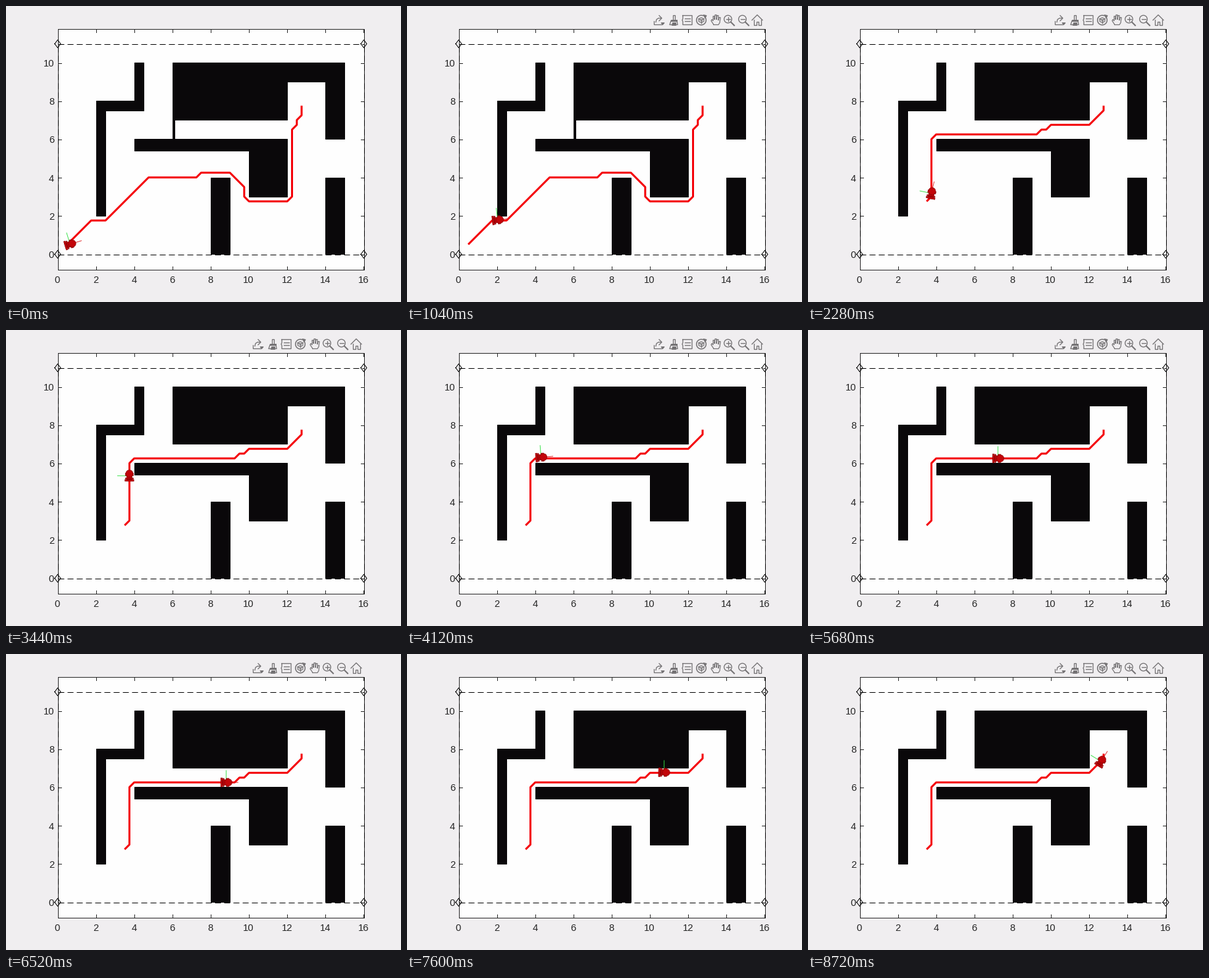
Recreate the animation shown at these times as a matplotlib script. Size 600 px wide and 450 px high, loop 8760 ms.

```python
import numpy as np
import matplotlib.pyplot as plt
from matplotlib.animation import FuncAnimation
from matplotlib.patches import Circle, Polygon, Rectangle
from matplotlib.transforms import Affine2D

W, H, DPI = 600, 450, 100
FRAMES, INTERVAL = 219, 40
PX = 72 / DPI
BLACK, INK, GRAY = "#0a080a", "#262626", "#747274"
RED, BODY, EDGE = "#f40008", "#c2060a", "#8a0206"

# pure pursuit settings, in map units per step
STEP, MAX_TURN, LOOKAHEAD = 0.075, 0.15, 0.5
LEAD = 2          # steps already driven when the loop starts
REPLAN = 51       # new route and removed wall
TOOLBAR_ON = 1

ROUTE_A = [(.5, .5), (1.75, 1.75), (2.5, 1.75), (4.75, 4), (7.25, 4),
           (7.5, 4.25), (9, 4.25), (9.75, 3.5), (9.75, 3), (10, 2.75),
           (12, 2.75), (12.25, 3), (12.25, 6.5), (12.5, 6.75), (12.5, 7),
           (12.75, 7.25), (12.75, 7.75)]
ROUTE_B = [(3.5, 2.75), (3.75, 3), (3.75, 6), (4, 6.25), (9.25, 6.25),
           (9.5, 6.5), (9.75, 6.5), (10, 6.75), (12, 6.75), (12.75, 7.5),
           (12.75, 7.75)]
WALLS = [
    [(2, 2), (2.5, 2), (2.5, 7.5), (4.5, 7.5), (4.5, 10), (4, 10), (4, 8), (2, 8)],
    [(6, 10), (15, 10), (15, 6), (14, 6), (14, 9), (12, 9), (12, 7), (6, 7)],
    [(4, 6), (12, 6), (12, 3), (10, 3), (10, 5.4), (4, 5.4)],
    [(8, 0), (9, 0), (9, 4), (8, 4)],
    [(14, 0), (15, 0), (15, 4), (14, 4)],
]
DOOR = [(6, 6), (6.1, 6), (6.1, 7), (6, 7)]


def to_px(pts):
    return np.asarray(pts, float) * (29.06, -29.09) + (78.5, 377)


def densify(route, gap=0.005):
    pts = np.array(route)
    s = np.r_[0, np.cumsum(np.hypot(*np.diff(pts, axis=0).T))]
    d = np.arange(0, s[-1], gap)
    return np.c_[np.interp(d, s, pts[:, 0]), np.interp(d, s, pts[:, 1])]


def drive():
    """Follow the routes and return one (x, y, heading) per frame."""
    a, b = densify(ROUTE_A), densify(ROUTE_B)
    x, y, th = 0.5, 0.5, 0.0
    poses = []
    for k in range(FRAMES + LEAD):
        if k >= LEAD:
            poses.append((x, y, th))
        track = a if k < REPLAN + LEAD else b
        dist = np.hypot(track[:, 0] - x, track[:, 1] - y)
        near = dist.argmin()
        ahead = np.flatnonzero(dist[near:] >= LOOKAHEAD)
        tx, ty = track[near + ahead[0]] if len(ahead) else track[-1]
        turn = 2 * STEP * np.sin(np.arctan2(ty - y, tx - x) - th) / LOOKAHEAD
        x += STEP * np.cos(th)
        y += STEP * np.sin(th)
        th += np.clip(turn, -MAX_TURN, MAX_TURN)
    return poses


fig = plt.figure(figsize=(W / DPI, H / DPI), dpi=DPI, facecolor="#f0eef0")
ax = fig.add_axes([0, 0, 1, 1])
ax.set_xlim(0, W)
ax.set_ylim(H, 0)
ax.axis("off")


def line(pts, color=INK, width=1, z=3, **kw):
    xs, ys = np.asarray(pts, float).T
    return ax.plot(xs, ys, color=color, lw=width * PX, zorder=z, **kw)[0]


def wall(pts):
    return ax.add_patch(Polygon(to_px(pts), fc=BLACK, ec=BLACK, lw=PX, zorder=2))


def draw_axes():
    left, right, top, bottom = 78.5, 543.5, 34.5, 400.5
    ax.add_patch(Rectangle((left, top), right - left, bottom - top,
                           fc="#fefefe", ec=INK, lw=PX, zorder=1))
    font = dict(family="Liberation Sans", size=14.7 * PX, color=INK)
    for v in range(0, 17, 2):
        x = to_px((v, 0))[0]
        line([(x, bottom), (x, bottom - 5)])
        line([(x, top), (x, top + 5)])
        ax.text(x - 0.5, 421, str(v), ha="center", va="baseline", **font)
    for v in range(0, 11, 2):
        y = to_px((0, v))[1] + 0.5
        line([(left, y), (left + 5, y)])
        line([(right, y), (right - 5, y)])
        ax.text(73, y + 5.5, str(v), ha="right", va="baseline", **font)
    y0, y1 = 377.5, 57.5
    dash = dict(color="black", linestyle=(0, (9, 5)), dash_capstyle="butt")
    for p, q in [((left, y0), (right, y0)), ((left, y1), (right, y1)),
                 ((left, y0), (left, y1)), ((right, y0), (right, y1))]:
        line([p, q], z=4, **dash)
    for x in (left, right):
        for y in (y0, y1):
            line([(x - 4.5, y), (x, y - 6), (x + 4.5, y), (x, y + 6),
                  (x - 4.5, y)], "black", z=4)


def draw_toolbar():
    """Icons as gray strokes, each placed round its own centre."""
    parts = []

    def stroke(cx, pts, width=1.3):
        parts.append(line(np.array(pts) + (cx, 21.5), GRAY, width))

    def ring(cx, x, y, r, fill="none"):
        parts.append(ax.add_patch(Circle((cx + x, 21.5 + y), r, fc=fill, ec=GRAY,
                                         lw=1.3 * PX, zorder=3)))

    def block(cx, pts, fill=GRAY):
        parts.append(ax.add_patch(Polygon(np.array(pts) + (cx, 21.5), fc=fill,
                                          ec=GRAY, lw=PX, zorder=3)))

    # export
    stroke(382, [(-7, 1), (-7, 6), (5, 6)])
    stroke(382, [(-4, 3), (-3, -1), (0, -3), (4, -3)])
    stroke(382, [(1, -7), (5, -3), (1, 1)])
    block(382, [(4, 4), (9, 4), (6.5, 7)])
    # brush
    stroke(405, [(-1, -1), (-1, -8), (2, -8), (2, -1)])
    block(405, [(-4, -1), (5, -1), (5, 1), (-4, 1)])
    stroke(405, [(-4, 1), (-6, 7), (6, 7), (5, 1)])
    block(405, [(-2, 3), (3, 3), (3, 7), (-3, 7)])
    # data tip
    stroke(426, [(-7, -7), (7, -7), (7, 7), (-7, 7), (-7, 2), (-8, 0),
                 (-7, -2), (-7, -7)])
    for y in (-3, 1):
        stroke(426, [(-4, y), (4, y)])
    # rotate
    a = np.radians(np.linspace(-35, 290, 40))
    stroke(447, np.c_[7.3 * np.cos(a), 7.3 * np.sin(a)], 1.5)
    block(447, [(3, -8), (8, -7), (6, -3)])
    block(447, [(0, -4), (4, -2), (4, 2), (0, 4), (-4, 2), (-4, -2)], "#d0ced0")
    stroke(447, [(-4, -2), (0, 0), (4, -2)])
    stroke(447, [(0, 0), (0, 4)])
    # pan
    stroke(469, [(-3, 7), (-7, 1), (-6, -1), (-4, 1), (-4, -6), (-2, -6),
                 (-2, -1), (-1, -8), (1, -8), (1, -1), (2, -7), (4, -7),
                 (4, 0), (5, -4), (7, -4), (6, 4), (4, 7), (-3, 7)], 1.2)
    # zoom in and out
    for cx, plus in ((489, True), (511, False)):
        ring(cx, -1.5, -1.5, 5.8)
        stroke(cx, [(3, 3), (8, 8)], 2)
        stroke(cx, [(-4.5, -1.5), (1.5, -1.5)])
        if plus:
            stroke(cx, [(-1.5, -4.5), (-1.5, 1.5)])
    # home
    stroke(532, [(-8, 0), (0, -8), (8, 0)])
    stroke(532, [(-5.5, -1), (-5.5, 7), (-1.5, 7), (-1.5, 2), (2, 2), (2, 7),
                 (6, 7), (6, -1)])
    return parts


def draw_robot():
    """Robot parts in local pixels, nose along +x, left side along +y."""
    def bar(x0, x1, half, color=BODY):
        return ax.add_patch(Rectangle((x0, -half), x1 - x0, 2 * half, fc=color,
                                      ec=EDGE, lw=0.6 * PX, zorder=7))

    parts = [line([(0, 0), (18, 0)], "#e02020", 0.9, 6),
             line([(0, 0), (0, 18)], "#30e040", 0.9, 6),
             bar(-8, 4, 4.2), bar(-8.2, -5.6, 6.8), bar(-4.8, -3.2, 6.2),
             bar(0.2, 4.2, 6.2)]
    parts.append(ax.add_patch(Circle((3.6, 0), 5.4, fc=BODY, ec=EDGE,
                                     lw=0.6 * PX, zorder=7)))
    parts.append(line([(-5.2, -4), (-5.2, 4)], EDGE, 0.8, 8))
    return parts


draw_axes()
for shape in WALLS:
    wall(shape)
door = wall(DOOR)
route = line(to_px(ROUTE_A), RED, 3, 5, solid_joinstyle="round",
             solid_capstyle="butt")
toolbar = draw_toolbar()
robot = draw_robot()
poses = drive()


def update(n):
    replanned = n >= REPLAN
    door.set_visible(not replanned)
    route.set_data(*to_px(ROUTE_B if replanned else ROUTE_A).T)
    for part in toolbar:
        part.set_visible(n >= TOOLBAR_ON)
    x, y, th = poses[n]
    place = Affine2D().rotate(th).scale(1, -1).translate(*to_px((x, y)))
    for part in robot:
        part.set_transform(place + ax.transData)
    return [door, route, *toolbar, *robot]


anim = FuncAnimation(fig, update, frames=FRAMES, interval=INTERVAL,
                     repeat=True, repeat_delay=0, blit=False)
plt.show()
```
